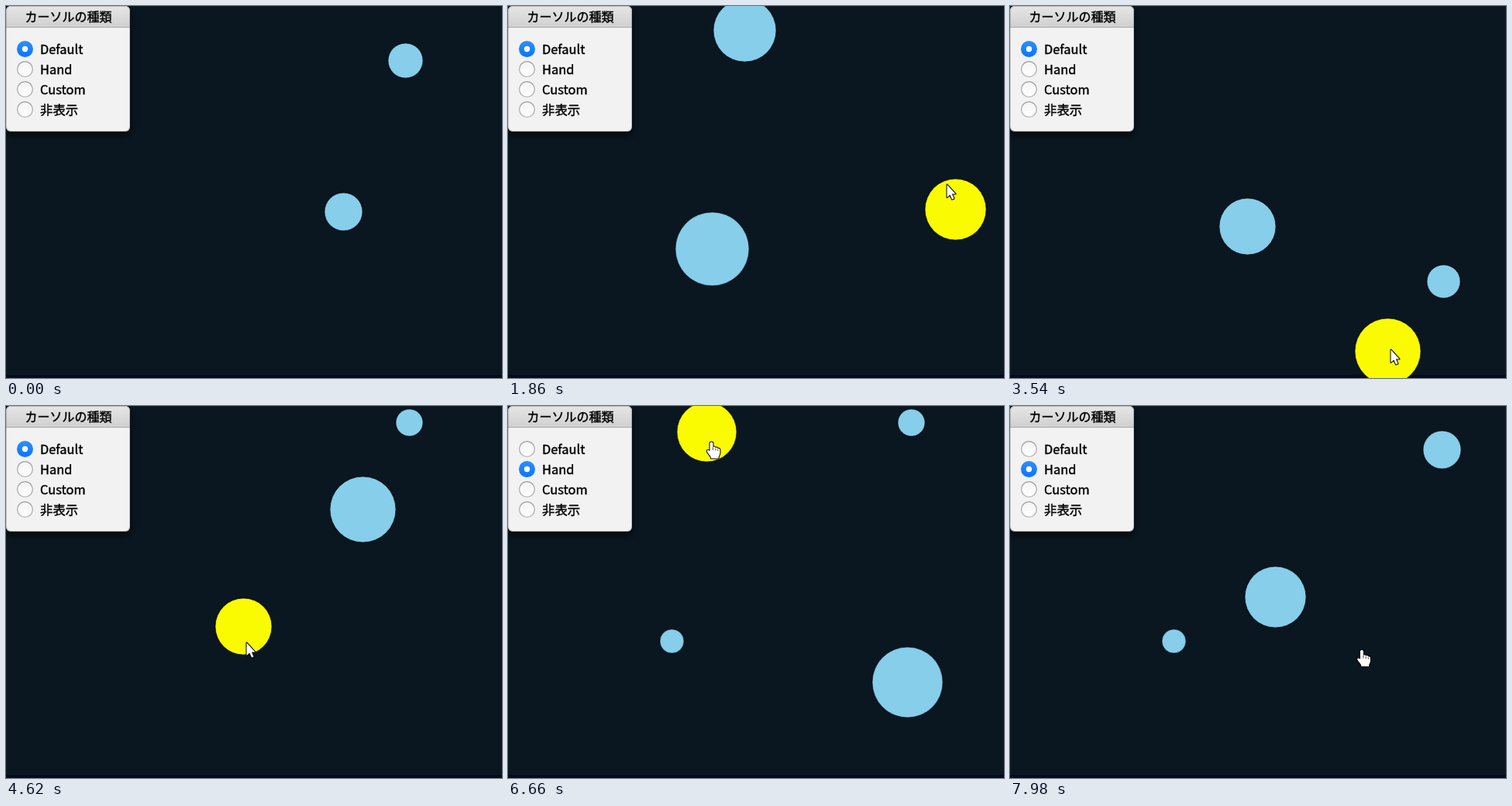
Write an HTML page with a canvas that moves like this. It is 640 px wide and 480 px high and loops after 8000 ms.

```html
<!DOCTYPE html>
<html lang="ja">
<head>
<meta charset="utf-8">
<style>
html, body { margin: 0; width: 100%; height: 100%; overflow: hidden; background: #0a1620; }
canvas { display: block; width: 640px; height: 480px; }
</style>
</head>
<body>
<canvas id="stage" width="640" height="480"></canvas>
<script>
const ctx = document.getElementById('stage').getContext('2d');
const LOOP = 8000, STEP = 60;
const SPAWN = 540, FIRST_SPAWN = -960, TRAVEL = 300;
const FONT = '"Noto Sans CJK JP", "Noto Sans CJK", "Noto Sans", sans-serif';
const labels = ['Default', 'Hand', 'Custom', '非表示'];

// A disc stays until it is clicked; dx, dy is where the pointer lands off its centre
const disc = (x, y, r, click = Infinity, dx = 0, dy = 0) => ({ x, y, r, click, dx, dy });
const hidden = disc(80, 100, 20);  // lies under the panel

// One disc appears every SPAWN ms, in this order
const discs = [
  disc(515.5, 70.5, 22.5, 855, -15, 14),
  disc(435.5, 265.5, 24.5, 1515, 18, -4),
  hidden,
  disc(577.5, 262.5, 39.5, 2000, -11, -32),
  disc(305.5, 31.5, 40.5, 2520),
  disc(263.5, 313.5, 47.5, 3220),
  disc(487.5, 445.5, 42.5, 3720, 4, -2),
  disc(559.5, 355.5, 21.5, 4200),
  disc(306.5, 284.5, 36.5, 4980, 4, 21),
  disc(520.5, 21.5, 17.5, 7380),
  disc(460.5, 133.5, 42.5, 5460),
  disc(515.5, 356.5, 45.5, 7900, -10, -39),
  hidden,
  disc(256.5, 33.5, 38.5, 6900, 6, 13),
  disc(211.5, 303.5, 15.5, 8380),
  disc(342.5, 246.5, 39.5),
  disc(557.5, 56.5, 24.5)
];
discs.forEach((d, i) => d.born = FIRST_SPAWN + SPAWN * i);

// The pointer enters from the right, then visits everything in order of clicks
const entry = { x: 646, y: 95, click: 60 };
const handRadio = { x: 22, y: 80, click: 5940 };
const route = [
  entry, handRadio,
  ...discs.filter(d => d.click < Infinity)
    .map(d => ({ x: d.x + d.dx, y: d.y + d.dy, click: d.click }))
].sort((a, b) => a.click - b.click);

function pointerAt(t) {
  const i = route.findIndex(stop => t <= stop.click);
  const to = route[i], from = route[i - 1] || to;
  const u = Math.min(1, Math.max(0, (t - from.click) / TRAVEL));
  const s = u * u * (3 - 2 * u);
  return [from.x + (to.x - from.x) * s, from.y + (to.y - from.y) * s];
}

function circle(x, y, r, color) {
  ctx.fillStyle = color;
  ctx.beginPath();
  ctx.arc(x, y, r, 0, Math.PI * 2);
  ctx.fill();
}

function vertical(y0, y1, from, to) {
  const g = ctx.createLinearGradient(0, y0, 0, y1);
  g.addColorStop(0, from);
  g.addColorStop(1, to);
  return g;
}

function text(str, x, y, size, align) {
  ctx.font = `500 ${size}px ${FONT}`;
  ctx.textAlign = align;
  ctx.fillStyle = ctx.strokeStyle = '#000';
  ctx.lineWidth = .4;
  ctx.fillText(str, x, y);
  ctx.strokeText(str, x, y);
}

function radio(y, on) {
  if (on) {
    circle(24.5, y, 10.5, vertical(y - 10, y + 10, '#2f8dfc', '#0a76ff'));
    circle(24.5, y, 3.7, '#fff');
  } else {
    circle(24.5, y, 10.5, vertical(y - 10, y + 10, '#9c9c9c', '#b9b9b9'));
    circle(24.5, y, 9.2, vertical(y - 9, y + 9, '#f4f4f4', '#fff'));
  }
}

function panel(selected) {
  const box = new Path2D();
  box.roundRect(0, 0, 160, 162, 6);
  ctx.save();
  ctx.shadowColor = 'rgba(0,0,0,.6)';
  ctx.shadowBlur = 10;
  ctx.shadowOffsetY = 6;
  ctx.fillStyle = '#f2f2f2';
  ctx.fill(box);
  ctx.restore();

  ctx.save();
  ctx.clip(box);
  ctx.fillStyle = vertical(0, 27, '#e6e6e6', '#d0d0d0');
  ctx.fillRect(0, 0, 160, 27);
  ctx.fillStyle = '#acacac';
  ctx.fillRect(0, 27, 160, 1);
  ctx.strokeStyle = 'rgba(0,0,0,.2)';
  ctx.lineWidth = 2;
  ctx.stroke(box);
  ctx.restore();

  text('カーソルの種類', 80.5, 20, 16, 'center');
  labels.forEach((label, i) => {
    radio(55.5 + 26 * i, i === selected);
    text(label, 44, 62 + 26 * i, 16.4, 'left');
  });
}

const arrow = new Path2D('M0 0V16.5L3.8 13L6.5 19L9 18L6.4 12H11Z');
const hand = new Path2D('M-2 2C-2-.6 2-.6 2 2V7C3 5.5 5 6 5.3 7.5C6.5 6.4 8 7 8.3 8.5' +
  'C9.5 7.7 11 8.5 11 10V14C11 16.5 9 18 9 21H-.5C-.5 18-4 15.5-5.5 12.5C-6.5 10.5-4 9.5-2 12Z');
const knuckles = new Path2D('M2 7V10.5M5.3 8V11M8.3 9V11.5');

function pointer(x, y, shape) {
  ctx.save();
  ctx.translate(x, y);
  ctx.lineJoin = 'round';
  ctx.strokeStyle = '#000';
  ctx.fillStyle = '#fff';
  ctx.lineWidth = 2;
  ctx.stroke(shape);
  ctx.fill(shape);
  ctx.lineWidth = .7;
  if (shape === hand) ctx.stroke(knuckles);
  ctx.restore();
}

function draw(t) {
  const [px, py] = pointerAt(t);
  const handMode = t >= handRadio.click;
  ctx.fillStyle = '#0a1620';
  ctx.fillRect(0, 0, 640, 480);
  ctx.fillStyle = '#070a1a';
  ctx.fillRect(0, 476, 640, 4);
  for (const { x, y, r, born, click } of discs) {
    if (t < born || t >= click) continue;
    const hover = Math.hypot(px - x, py - y) < r;
    circle(x, y, r, hover ? '#fafa00' : '#87ceeb');
    ctx.strokeStyle = 'rgba(0,0,0,.6)';
    ctx.lineWidth = 1;
    ctx.stroke();
  }
  panel(handMode ? 1 : 0);
  pointer(px, py, handMode ? hand : arrow);
}

const start = performance.now();
function tick() {
  const t = (performance.now() - start) % LOOP;
  draw(Math.floor(t / STEP) * STEP);
  requestAnimationFrame(tick);
}
tick();
</script>
</body>
</html>
```
